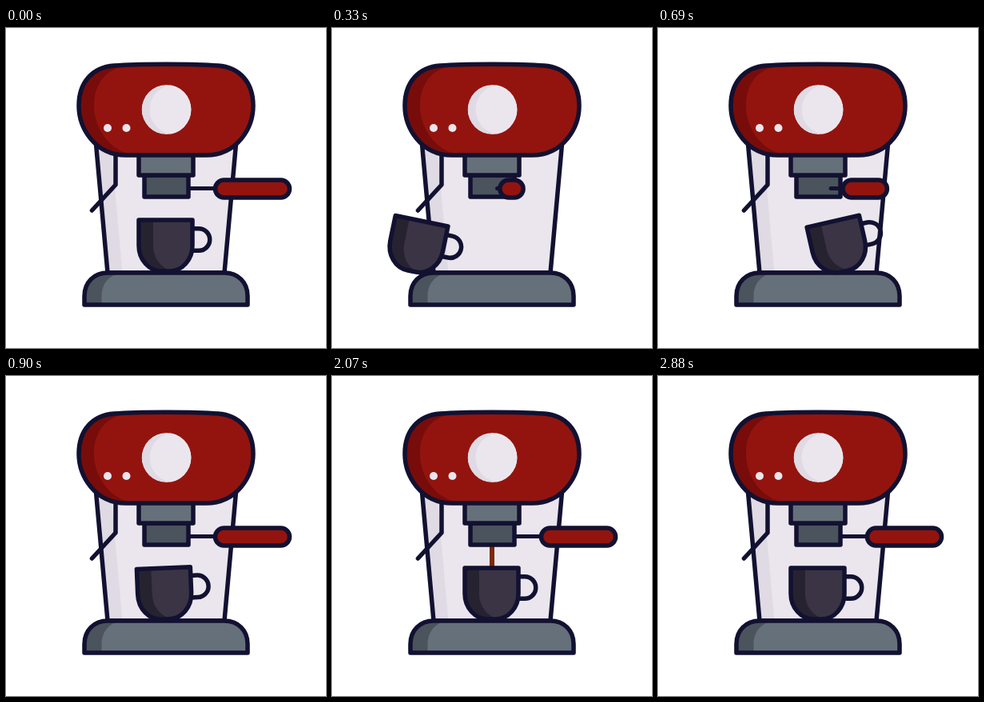
Recreate the animation shown at these times as an HTML page with a canvas. Size 400 by 400 pixels, loop 3.27 s.

```html
<!DOCTYPE html>
<html lang="en">
<head>
<meta charset="utf-8">
<title>Coffee machine</title>
<style>
  html, body { margin: 0; width: 100%; height: 100%; overflow: hidden; background: #fff; }
  canvas { display: block; width: 400px; height: 400px; }
</style>
</head>
<body>
<canvas id="stage" width="400" height="400"></canvas>
<script>
const ctx = document.getElementById('stage').getContext('2d');
const LOOP = 3270;
const INK = '#121131', RED = '#93140e', DARK_RED = '#780c0a';
const PALE = '#ebe6ed', PALE_SHADE = '#dfdae3';
const GREY = '#66707a', DARK_GREY = '#4b535c';
const CUP = '#3b3445', CUP_SHADE = '#272230', COFFEE = '#7a2a0c';

const head = new Path2D('M150 159C111 159 91 125 91 97C91 68 108 49 135 47C165 44.5 235 44.5 265 47C292 49 309 68 309 97C309 125 289 159 250 159Z');
const body = new Path2D('M112.5 145L127 306H273L287.5 145Z');
const base = new Path2D('M98 346V335C98 318 110 306 127 306H273C290 306 302 318 302 335V346Z');
const wand = new Path2D('M137 160V196L107.5 228');
const cupBody = new Path2D('M166 240H233V272C233 290 220 304 204 304H195C179 304 166 290 166 272Z');
const cupEar = new Path2D('M233 250.75H241A13.75 13.75 0 0 1 241 278.25H233');
const dial = disc(200.5, 102, 31);

const clamp = v => Math.min(1, Math.max(0, v));
const phase = (t, from, to) => clamp((t - from) / (to - from));
const smooth = p => p * p * (3 - 2 * p);
const mix = (a, b, p) => a + (b - a) * p;

function disc(x, y, r) {
  const path = new Path2D();
  path.arc(x, y, r, 0, Math.PI * 2);
  return path;
}

function fill(path, color) {
  ctx.fillStyle = color;
  ctx.fill(path);
}

function stroke(path, width = 5.5, color = INK) {
  ctx.strokeStyle = color;
  ctx.lineWidth = width;
  ctx.stroke(path);
}

// The shade is what remains when the lit shape is shifted to the right.
function shaded(path, light, dark, shift) {
  ctx.save();
  ctx.clip(path);
  fill(path, dark);
  ctx.translate(shift, 0);
  fill(path, light);
  ctx.restore();
}

function line(x1, y1, x2, y2, width, color) {
  const path = new Path2D();
  path.moveTo(x1, y1);
  path.lineTo(x2, y2);
  stroke(path, width, color);
}

function box(x, y, w, h, color, radius = 0) {
  const path = new Path2D();
  path.roundRect(x, y, w, h, radius);
  fill(path, color);
  stroke(path);
}

function drawCoffee(t) {
  const top = mix(205, 260, smooth(phase(t, 2040, 2880)));
  const bottom = mix(205, 260, smooth(phase(t, 1060, 1410)));
  if (bottom > top) line(200, top, 200, bottom, 6, COFFEE);
}

function drawHandle(t) {
  const turn = smooth(phase(t, 0, 390)) - smooth(phase(t, 510, 900));
  const left = mix(261.5, 206.5, turn);
  const right = mix(354.5, 231.5, turn);
  line(mix(230, 205, turn), 200.5, left, 200.5, 5, INK);
  box(left, 190, right - left, 22, RED, 11);
}

function cupPose(t) {
  if (t < 480) {
    const p = (Math.max(0, t - 28) / 422) ** 3;
    return { shift: -271 * p, tilt: 31.5 * p };
  }
  return {
    shift: 271 * (1 - phase(t, 480, 900)) ** 3,
    tilt: -31.5 * (1 - phase(t, 480, 1060)) ** 2
  };
}

function drawCup(t) {
  const { shift, tilt } = cupPose(t);
  ctx.save();
  ctx.translate(200 + shift, 304);
  ctx.rotate(tilt * Math.PI / 180);
  ctx.translate(-200, -304);
  stroke(cupEar);
  shaded(cupBody, CUP, CUP_SHADE, 18);
  stroke(cupBody);
  ctx.restore();
}

function draw(t) {
  ctx.fillStyle = '#fff';
  ctx.fillRect(0, 0, 400, 400);
  ctx.lineCap = ctx.lineJoin = 'round';

  shaded(body, PALE, PALE_SHADE, 18.5);
  stroke(body);
  stroke(wand);
  drawCoffee(t);
  box(173, 184, 55, 27, DARK_GREY);
  box(166, 158, 68, 26, GREY);
  drawHandle(t);

  shaded(head, RED, DARK_RED, 19);
  stroke(head);
  shaded(dial, PALE, PALE_SHADE, 10);
  fill(disc(127, 125, 5), PALE);
  fill(disc(150.5, 125, 5), PALE);

  shaded(base, GREY, DARK_GREY, 21.5);
  stroke(base);
  drawCup(t);
}

const start = performance.now();
function tick() {
  draw((performance.now() - start) % LOOP);
  requestAnimationFrame(tick);
}
tick();
</script>
</body>
</html>
```
